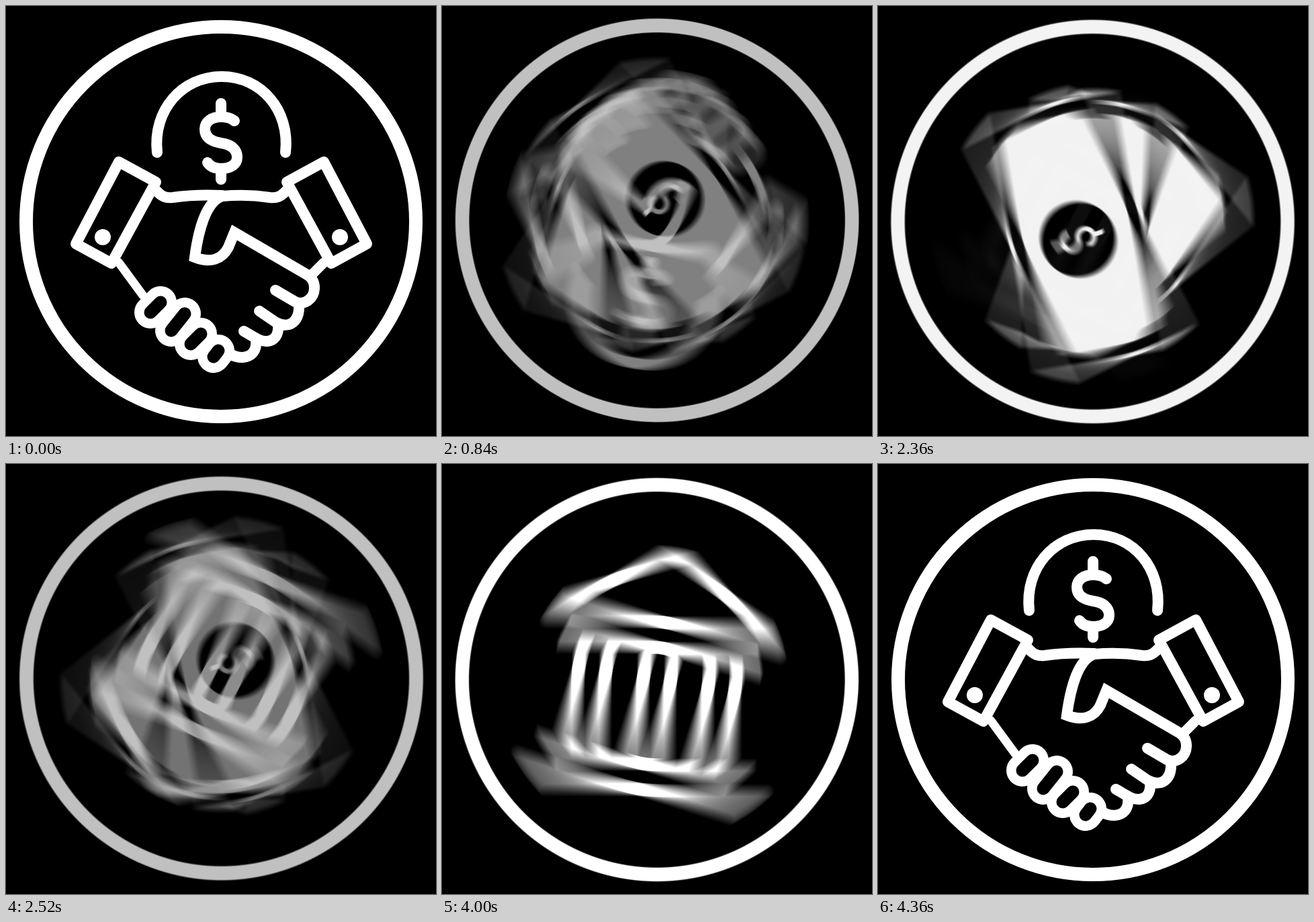
Animation, 640 px wide and 640 px high, one loop 5000 ms. Source, as an HTML page with a canvas:

```html
<!DOCTYPE html>
<html lang="en">
<head>
<meta charset="utf-8">
<title>Deal, cash, bank</title>
<style>
  html, body { margin: 0; width: 100%; height: 100%; overflow: hidden; background: #000; }
  canvas { display: block; width: 640px; height: 640px; }
</style>
</head>
<body>
<canvas id="stage" width="640" height="640"></canvas>
<script>
const SIZE = 640, MID = SIZE / 2;
const LOOP = 5000, HOLD = 40;
const SPIN_STEPS = 20, STEP_ANGLE = Math.PI * 2 / SPIN_STEPS;
const BLUR_SAMPLES = 51;

function makeLayer(paint) {
  const layer = document.createElement('canvas');
  layer.width = layer.height = SIZE;
  const c = layer.getContext('2d');
  c.fillStyle = c.strokeStyle = '#fff';
  paint(c);
  return layer;
}

function stroke(c, path, width, cap = 'round', join = 'round') {
  c.lineWidth = width;
  c.lineCap = cap;
  c.lineJoin = join;
  c.stroke(new Path2D(path));
}

function dot(c, x, y, r) {
  c.beginPath();
  c.arc(x, y, r, 0, Math.PI * 2);
  c.fill();
}

function erase(c, draw) {
  c.globalCompositeOperation = 'destination-out';
  draw();
  c.globalCompositeOperation = 'source-over';
}

function ring(c) {
  c.lineWidth = 20;
  c.beginPath();
  c.arc(320, 321, 290, 0, Math.PI * 2);
  c.stroke();
}

function cuff(c) {
  stroke(c, 'M168 232L223 262L157 383L104 354Z', 16);
  dot(c, 144, 344, 12);
}

function handshake(c) {
  stroke(c, 'M225 218C218 155 262 105 321 105C380 105 423 155 416 218', 16);
  stroke(c, 'M320 145V164M320 244V258', 16);
  stroke(c, 'M340 171C334 166 327 165 320 165C305 165 296 173 296 183' +
    'C296 197 308 202 320 204C335 206 344 213 344 225' +
    'C344 236 334 242 320 242C311 242 304 239 300 233', 16);

  cuff(c);
  c.save();
  c.translate(641, 0);
  c.scale(-1, 1);
  cuff(c);
  c.restore();

  // Top of both hands, thumb and back of the right hand
  stroke(c, 'M224 275C232 284 238 286 248 285C275 281 300 281 322 282', 16);
  stroke(c, 'M417 275C409 284 403 286 393 285C366 281 345 281 322 283' +
    'C297 291 286 336 281 374C304 383 322 377 331 359L340 337L450 401', 16, 'round', 'miter');

  // Right fingers
  stroke(c, 'M473 382L456 399', 15);
  stroke(c, 'M450 401C463 411 461 430 450 438C443 443 436 443 430 440L401 423', 16);
  stroke(c, 'M436 443C437 458 433 468 424 473C416 477 408 474 402 471L377 454', 16);
  stroke(c, 'M405 476C406 490 399 498 389 499C378 500 370 493 354 484', 16);
  stroke(c, 'M372 496C374 514 365 522 352 523C345 523 340 522 334 518', 16);

  // Left fingers
  stroke(c, 'M168 382L204 431', 13);
  const fingers = 'M215 456L230 441M246 483L266 458M275 503L290 488M309 522L316 513';
  stroke(c, fingers, 48);
  erase(c, () => stroke(c, fingers, 19));
}

function bill(c, x, y, degrees, w, h, isBack) {
  const inset = isBack ? 17 : 18.3;
  const bodyEnd = isBack ? h * 0.7 : h - inset;
  c.save();
  c.translate(x, y);
  c.rotate(degrees * Math.PI / 180);
  erase(c, () => c.fillRect(0, 0, w, h));
  c.fillRect(inset, inset, w - 2 * inset, bodyEnd - inset);
  erase(c, () => {
    for (const bx of [inset, w - inset])
      for (const by of [inset, bodyEnd]) dot(c, bx, by, 20.5);
  });
  const outline = isBack
    ? `M${w * 0.6} ${h}H0V0H${w}V${h * 0.8}`
    : `M0 0H${w}V${h}H0Z`;
  stroke(c, outline, 6, 'butt', 'miter');
  c.restore();
}

function money(c) {
  bill(c, 337, 136, 15.6, 187, 300, true);
  bill(c, 174, 178, -16.2, 187, 369, true);
  bill(c, 101.5, 280, -45, 197, 389, false);
  c.save();
  c.translate(313, 354.5);
  erase(c, () => dot(c, 0, 0, 56));
  c.rotate(Math.PI / 4);
  stroke(c, 'M0 -39V-24M0 24V39', 6.5, 'butt');
  stroke(c, 'M12.5 -12A12.5 12 0 1 0 0 0A12.5 12 0 1 1 -12.5 12', 6.5, 'butt');
  c.restore();
}

function bank(c) {
  stroke(c, 'M154.5 235.5L320 130.5L485.5 235.5Z', 19);
  stroke(c, 'M154.5 485.5H485.5', 19);
  for (const y of [264, 438]) c.fillRect(170, y, 299, 19);
  for (const x of [193, 233.5, 290, 330.5, 387, 427]) c.fillRect(x, 275, 19.5, 170);
}

function drawTurned(c, layer, angle) {
  c.save();
  c.translate(MID, MID);
  c.rotate(angle);
  c.drawImage(layer, -MID, -MID);
  c.restore();
}

// Each icon has a still layer and one smeared over a single spin step.
const icons = [handshake, money, bank].map(paint => {
  const still = makeLayer(c => { ring(c); paint(c); });
  const smeared = makeLayer(c => {
    c.globalCompositeOperation = 'lighter';
    c.globalAlpha = 1 / BLUR_SAMPLES;
    for (let i = 0; i < BLUR_SAMPLES; i++)
      drawTurned(c, still, STEP_ANGLE * (i + 0.5) / BLUR_SAMPLES);
  });
  return { still, smeared };
});

const ctx = document.getElementById('stage').getContext('2d');

function render(time) {
  const held = Math.floor(time % LOOP / HOLD) * HOLD;
  const tick = Math.floor(held * 3 / 50) - 40; // 60 ticks per second, first spin at 0
  const index = Math.max(0, Math.floor(tick / 100));
  const step = tick < 0 ? -1 : tick % 100;
  const next = icons[(index + 1) % icons.length];

  ctx.globalAlpha = 1;
  ctx.fillStyle = '#000';
  ctx.fillRect(0, 0, SIZE, SIZE);
  if (step < 0) {
    ctx.drawImage(icons[0].still, 0, 0);
  } else if (step >= SPIN_STEPS) {
    ctx.drawImage(next.still, 0, 0);
  } else {
    const fade = step / SPIN_STEPS;
    ctx.globalAlpha = 1 - fade;
    drawTurned(ctx, icons[index].smeared, step * STEP_ANGLE);
    ctx.globalAlpha = fade;
    drawTurned(ctx, next.smeared, step * STEP_ANGLE);
  }
}

const start = performance.now();
function loop() {
  render(performance.now() - start);
  requestAnimationFrame(loop);
}
loop();
</script>
</body>
</html>
```
